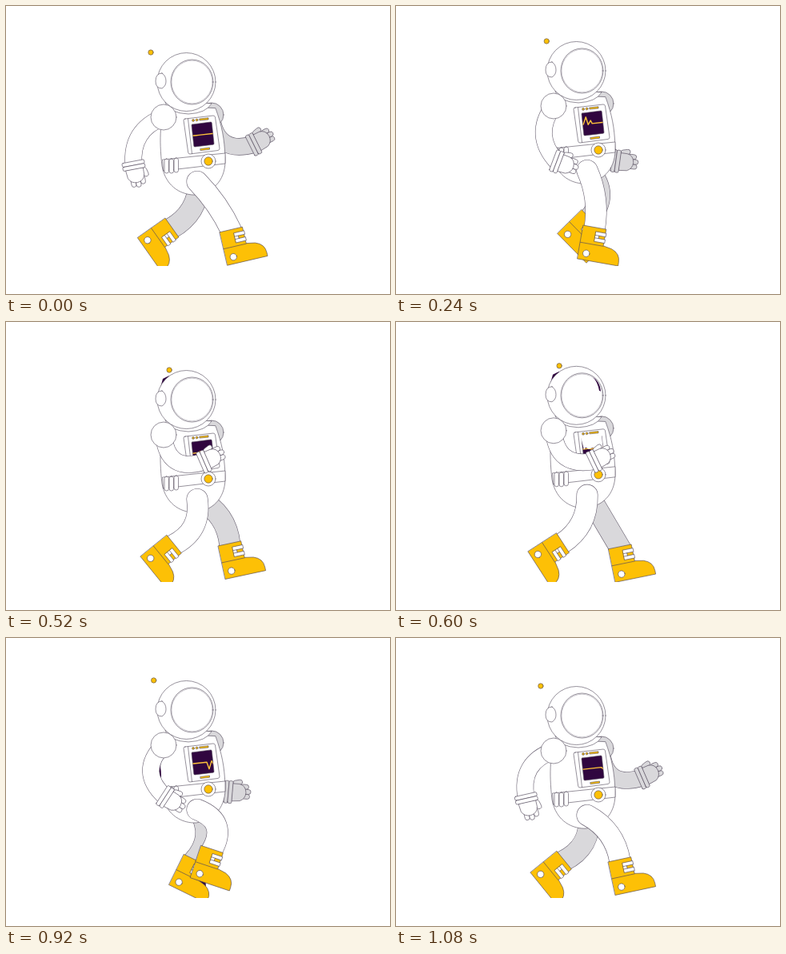
These frames come from a looping animation (480x360 px, 1120 ms). An HTML page:

```html
<!DOCTYPE html>
<html lang="en">
<head>
<meta charset="utf-8">
<title>Walking astronaut</title>
<style>
  html, body { margin: 0; width: 100%; height: 100%; overflow: hidden; background: #fff; }
  svg { display: block; width: 480px; height: 360px; }
  .line { stroke: #51485a; stroke-width: .6; stroke-linejoin: round; stroke-linecap: round; }
  .white { fill: #fff; }
  .gray { fill: #d9d8db; }
  .gold { fill: #fdc006; }
  .dark { fill: #30063f; }
  .none { fill: none; }
  .edge, .tube { fill: none; stroke-linecap: round; }
  .edge { stroke: #6a6272; }
  .leg .edge { stroke-width: 27; }
  .leg .tube { stroke-width: 25.8; }
  .arm .edge { stroke-width: 21.6; }
  .arm .tube { stroke-width: 20.4; }
  .near .tube { stroke: #fff; }
  .far .tube { stroke: #d9d8db; }
  .near .glove { fill: #fff; }
  .far .glove { fill: #d9d8db; }
</style>
</head>
<body>
<svg viewBox="0 0 480 360">
  <defs>
    <clipPath id="ground"><rect width="480" height="325"/></clipPath>
    <clipPath id="screenClip"><path d="M232 148L257 145L260 173L235 176Z"/></clipPath>
    <g id="boot" class="line">
      <path class="gold" d="M0 0H29V21L40 23Q51.500 27 51.500 38V42.500H0Z"/>
      <path class="none" d="M0 21.500H29"/>
      <path class="white" d="M17 5H30V9.500H21.500V13H30V17.500H17Z"/>
      <path class="none" d="M17 9.500H21.500M17 13H21.500"/>
      <circle class="white" cx="9.600" cy="34" r="4.200"/>
    </g>
    <g id="hand" class="line">
      <rect x="-7" y="16" width="6" height="11" rx="3"/>
      <rect x="5" y="15" width="6" height="10" rx="3"/>
      <rect x="-1" y="17" width="6" height="11" rx="3"/>
      <rect x="9" y="5" width="6" height="12" rx="3" transform="rotate(-14 11 8)"/>
      <path d="M-11 5L-10 15Q-7 22 1 22Q10 21 11 13V5Z"/>
      <rect x="-14" y="-5" width="28" height="5" rx="1.500"/>
      <rect x="-14" y="0" width="28" height="5" rx="1.500"/>
    </g>
  </defs>
  <g clip-path="url(#ground)">
    <g id="farArm" class="arm far">
      <path class="edge"/><path class="tube"/><use class="glove" href="#hand"/>
    </g>
    <path id="bootGap" class="dark"/>
    <g id="farLeg" class="leg far">
      <path class="edge"/><path class="tube"/><use href="#boot"/>
    </g>
    <g class="bob">
      <circle class="gray line" cx="257" cy="136" r="15"/>
      <path class="white line" d="M200 125C193 140 191 165 195 200C200 228 222 237 238 236C262 232 275 215 274 190C273 165 270 150 262 128Z"/>
      <ellipse id="armGap" class="dark" cx="189" cy="177" rx="5" ry="16"/>
      <g class="line">
        <path class="white" d="M196 192L274 184V197L197 206Z"/>
        <rect class="white" x="198" y="191" width="5.500" height="18" rx="2.700"/>
        <rect class="white" x="204" y="191" width="5.500" height="18" rx="2.700"/>
        <rect class="white" x="210" y="190" width="5.500" height="18" rx="2.700"/>
        <path class="white" d="M224 141L259 137Q261 137 261.500 139L267 178Q267 180 265 180.500L230 185Q228 185 227.700 183L222 143Q222 141 224 141Z"/>
        <path class="none" d="M227.500 141L232.500 184.500"/>
        <circle class="gold" cx="234" cy="143" r="1.400"/>
        <circle class="gold" cx="238.500" cy="142.500" r="1.400"/>
        <path class="gold" d="M242 141L253 139.800V142L242.300 143Z"/>
        <path class="gold" d="M243 178.500L254.500 177V179.300L243.300 180.600Z"/>
        <path class="dark" d="M233 148L256 145Q257 145 257.200 146L260 172Q260 173 259 173.200L236 176Q235 176 234.800 175L232 149Q232 148 233 148Z"/>
      </g>
      <path id="pulse" class="none" stroke="#fdc23a" stroke-width="1.400" stroke-linejoin="round" clip-path="url(#screenClip)"/>
      <path id="glare" class="white" d="M231 147L257 144L260 175L252 177L258 165L254 161L251 164L247 160L241 162L237 160L235 163Z"/>
      <circle class="white line" cx="253" cy="194" r="9"/>
      <circle class="gold line" cx="253" cy="194" r="5.200"/>
    </g>
    <g id="nearLeg" class="leg near">
      <path class="edge"/><path class="tube"/><use href="#boot"/>
    </g>
    <g class="bob">
      <path class="white line" d="M199 121Q204 134 228 135Q250 134 257 122Z"/>
      <path id="headGap" class="dark" d="M193 80L196 69L204 65L202 74Z"/>
      <circle class="white line" cx="225.500" cy="95" r="36.500"/>
      <ellipse class="white line" cx="232.500" cy="95" rx="26.500" ry="28"/>
      <ellipse class="none line" cx="232.500" cy="95" rx="25.500" ry="26.800" stroke-opacity=".5"/>
      <path id="shine" class="dark" d="M246 72Q255 78 256 90L254 89Q252 78 246 72Z"/>
      <path class="white line" d="M195 84Q187 84 187 94Q187 103 195 103Q200 100 200 94Q200 87 195 84Z"/>
      <circle id="antenna" class="gold line" cy="58" r="3.200"/>
    </g>
    <g id="nearArm" class="arm near">
      <path class="edge"/><path class="tube"/><use class="glove" href="#hand"/>
    </g>
    <g class="bob"><circle class="white line" cx="197" cy="139" r="16"/></g>
  </g>
</svg>
<script>
const LOOP = 1120, STEP = 40;
const { cos, sin, PI } = Math;
const $ = id => document.getElementById(id);

// The gait is periodic: every part is a swing plus a few overtones of phase p.
const headY = p => 89 + 8.5 * cos(2 * p + .785);
const antennaX = p => 192.5 - 13.5 * cos(p) + 2 * cos(3 * p);

// Heel-side top corner of the boot and its tilt
const foot = p => [
  233.2 + 29.7 * cos(p + .07) + 4.5 * cos(3 * p - .23),
  268.8 + 11.4 * cos(p - .84) + 5.3 * cos(2 * p - .15) + 1.2 * cos(3 * p + .43),
  23.6 - 34.5 * cos(p - .3) + 4.8 * cos(2 * p - 2.19) + 1.7 * cos(3 * p - 2.19)
];

// Wrist relative to the shoulder and its tilt
const hand = p => [
  9.5 - 39.2 * cos(p - .05) - 2.2 * cos(2 * p - .46) - 5.9 * cos(3 * p),
  57.8 + 10.7 * cos(p + .1) - 11.4 * cos(2 * p + .34) + 2.5 * cos(3 * p + .25),
  -69.4 + 46.6 * cos(p) + 6.3 * cos(2 * p + .41) + 6.3 * cos(3 * p)
];

// Point (u, v) of a part placed at x, y and turned by deg
function place([x, y, deg], u, v) {
  const r = deg * PI / 180, c = cos(r), s = sin(r);
  return [x + u * c - v * s, y + u * s + v * c];
}

// A hose of fixed length bows out more as its ends come closer
function hose([x0, y0], [x1, y1], length, bow) {
  const dx = x1 - x0, dy = y1 - y0, d = Math.hypot(dx, dy);
  const b = bow * Math.sqrt(Math.max(length * length - d * d, 0)) / d;
  return `M${x0} ${y0}Q${(x0 + x1) / 2 + dy * b} ${(y0 + y1) / 2 - dx * b} ${x1} ${y1}`;
}

function drawLimb(id, path, [x, y, deg]) {
  const [edge, tube, end] = $(id).children;
  edge.setAttribute('d', path);
  tube.setAttribute('d', path);
  end.setAttribute('transform', `translate(${x} ${y}) rotate(${deg})`);
}

function drawLeg(id, hip, p) {
  const boot = foot(p);
  drawLimb(id, hose(hip, place(boot, 14.5, 2), 76, .6), boot);
  return boot;
}

function drawArm(id, [x, y], p) {
  const [dx, dy, deg] = hand(p);
  const wrist = [x + dx, y + dy, deg];
  drawLimb(id, hose([x, y], wrist, 80, -.72), wrist);
}

// The heartbeat drifts right and flips from a peak to a dip
function drawPulse(p) {
  const x = 235 + 26 * (p / (2 * PI)) ** 1.6;
  const h = -8.5 * sin(p) - 1.5 * sin(2 * p);
  const pts = [[232, 0], [x - 3, 0], [x, h], [x + 3, -h * .1], [x + 6, h * .45], [x + 8, 0], [262, 0]];
  $('pulse').setAttribute('d', 'M' + pts.map(([px, py]) => `${px} ${162 - (px - 235) * .11 + py}`).join('L'));
}

function show(id, on) {
  $(id).style.display = on ? '' : 'none';
}

function draw(t) {
  const p = t / LOOP * 2 * PI;
  const y = headY(p), ball = antennaX(p);
  for (const g of document.querySelectorAll('.bob')) g.setAttribute('transform', `translate(0 ${y - 95})`);

  drawArm('farArm', [257, y + 44], p + PI);
  drawArm('nearArm', [197, y + 44], p);
  const far = drawLeg('farLeg', [241, y + 124.5], p + PI);
  const near = drawLeg('nearLeg', [239, y + 124.5], p);

  // Dark space between the boots as they pass
  const [rear, front] = near[2] > far[2] ? [near, far] : [far, near];
  const gap = [place(rear, 29, 0), place(front, 0, 18), place(front, 1, 42), place(rear, 50, 38)];
  $('bootGap').setAttribute('d', 'M' + gap.join('L') + 'Z');
  show('bootGap', Math.abs(far[0] - near[0]) < 40);

  show('headGap', ball > 195);
  show('armGap', t >= 880 && t < 960);
  const flash = t >= 560 && t < 640;
  show('glare', flash);
  show('shine', flash);

  $('antenna').setAttribute('cx', ball);
  drawPulse(p);
}

const start = performance.now();
function tick() {
  const t = Math.max(performance.now() - start, 0) % LOOP;
  draw(Math.floor(t / STEP) * STEP);
  requestAnimationFrame(tick);
}
tick();
</script>
</body>
</html>
```
